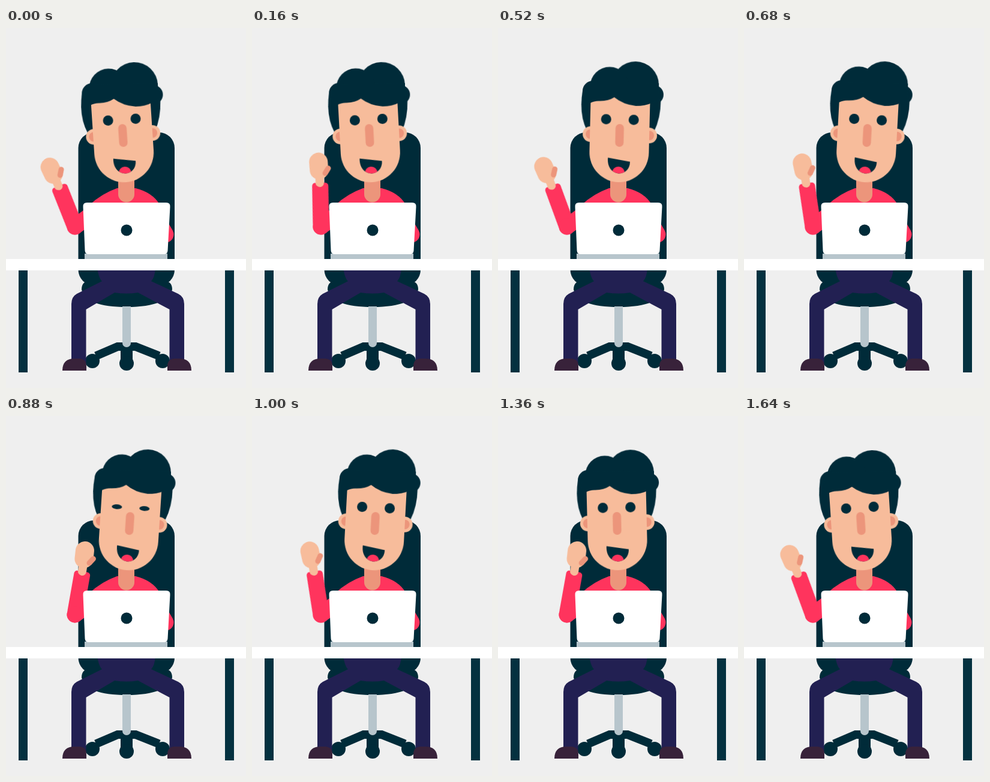
An HTML page without scripts that plays this animation: 400 px wide and 600 px high, repeating every 1.68 s.

```html
<!DOCTYPE html>
<html lang="en">
<head>
<meta charset="utf-8">
<title>Waving at the desk</title>
<style>
  :root {
    --dark: #002b39;
    --pink: #ff345d;
    --skin: #f7bc9b;
    --shade: #ec957b;
    --pants: #222052;
    --metal: #b7c5cc;
    --sine: cubic-bezier(.364, 0, .636, 1);
  }
  html, body { margin: 0; width: 100%; height: 100%; overflow: hidden; background: #efefef; }
  svg { display: block; width: 100%; height: 100%; }
  .dark { fill: var(--dark); }
  .pink { fill: var(--pink); }
  .skin { fill: var(--skin); }
  .shade { fill: var(--shade); }
  .pants { fill: var(--pants); }
  .metal { fill: var(--metal); }
  .shoe { fill: #38223a; }
  .leg { fill: #043140; }
  .line { fill: none; stroke-linecap: round; stroke-linejoin: round; }

  .head {
    transform-origin: 200.5px 266px;
    animation: tilt 840ms var(--sine) infinite alternate;
  }
  /* hair leans less than the face */
  .hair {
    transform-origin: 164px 100px;
    animation: lag 840ms var(--sine) infinite alternate;
  }
  .forearm {
    transform-origin: 115px 331px;
    animation: wave 280ms var(--sine) infinite alternate;
  }
  .eye {
    transform-box: fill-box;
    transform-origin: center;
    animation: blink 1680ms linear infinite;
  }
  @keyframes tilt { from { transform: rotate(-3.75deg); } to { transform: rotate(3.75deg); } }
  @keyframes lag { from { transform: rotate(2.1deg); } to { transform: rotate(-2.1deg); } }
  @keyframes wave { from { transform: rotate(-31.7deg); } to { transform: rotate(1.7deg); } }
  @keyframes blink {
    0%, 44%, 56%, 100% { transform: scaleY(1); }
    50% { transform: scaleY(.1); }
  }
</style>
</head>
<body>
<svg viewBox="0 0 400 600">
  <defs>
    <clipPath id="mouth">
      <path id="lips" d="M182 216.500L219 222.500C219 236 210 242.500 200 242.500C188 241 181 231 182 216.500Z"/>
    </clipPath>
    <path id="shoe" d="M94 571Q94 551 114 551H123Q134 552 134 564V571Z"/>
  </defs>

  <!-- chair -->
  <g class="dark">
    <rect x="120.500" y="174" width="160.500" height="255" rx="26"/>
    <path d="M126 436Q126 423 137 422H266Q277 423 277 436Q268 465 201 465Q133 465 126 436Z"/>
    <path d="M150 546.500L186 531H216L255 546.500" fill="none" stroke="var(--dark)" stroke-width="14"/>
    <rect x="191" y="526" width="20" height="30"/>
    <circle cx="144" cy="555" r="12"/>
    <circle cx="201" cy="559" r="12"/>
    <circle cx="261" cy="555" r="12"/>
  </g>
  <path class="metal" d="M194 464H208V525A7 7 0 0 1 194 525Z"/>

  <!-- legs -->
  <path class="pants" d="M152 400C154 413 157 419 160 422L118 443Q109 448 109 460V560H133.500V469L181 441Q201 444 220 441L272.500 469V560H297V460Q297 448 287 443L242 422Q248 416 249 400Z"/>
  <use href="#shoe" class="shoe"/>
  <use href="#shoe" class="shoe" transform="matrix(-1 0 0 1 403 0)"/>

  <!-- body -->
  <path class="pink" d="M140 320V294Q160 276 185 267H216Q244 274 256 294V320Z"/>
  <path class="line" d="M245 308L266 344" stroke="var(--pink)" stroke-width="27"/>
  <path class="line" d="M115 331L150 305" stroke="var(--pink)" stroke-width="27"/>
  <path class="shade" d="M187 245H214V277A13.5 13.5 0 0 1 187 277Z"/>

  <g class="head">
    <g class="dark hair">
      <circle cx="225" cy="95" r="39"/>
      <circle cx="182" cy="98" r="32.500"/>
      <circle cx="154" cy="106" r="17"/>
      <circle cx="256" cy="111" r="16"/>
      <path d="M137 106Q131 145 145 172H257Q270 145 267 106Z"/>
    </g>
    <g class="skin">
      <circle cx="152" cy="178" r="13"/>
      <circle cx="250" cy="178" r="13"/>
    </g>
    <g class="shade">
      <circle cx="152" cy="178" r="8"/>
      <circle cx="250" cy="178" r="8"/>
    </g>
    <path class="skin" d="M151 110H250V207A49.5 50 0 0 1 151 207Z"/>
    <path class="dark hair" d="M140 116L150 126Q157 122 166 122.500Q181 122 190 116Q205 128 226 130Q242 130 252 125L264 120V92H150Z"/>
    <g class="dark">
      <circle class="eye" cx="177.5" cy="152.5" r="8.5"/>
      <circle class="eye" cx="223.5" cy="152.5" r="8.5"/>
    </g>
    <rect class="shade" x="193.5" y="160" width="14" height="38" rx="7"/>
    <use href="#lips" class="dark"/>
    <circle class="pink" cx="200" cy="241.500" r="10.500" clip-path="url(#mouth)"/>
  </g>

  <g class="forearm">
    <g class="pink" transform="rotate(10 115 331)">
      <rect x="101.5" y="258" width="27" height="73" rx="5"/>
      <circle cx="115" cy="331" r="13.5"/>
    </g>
    <g class="line" stroke="var(--skin)">
      <path d="M130 240L127 259" stroke-width="14"/>
      <path d="M131.5 224.5L130 238" stroke-width="31"/>
    </g>
    <path class="line" d="M139 245L145.500 238" stroke="var(--shade)" stroke-width="9"/>
  </g>

  <!-- laptop -->
  <path class="metal" d="M131 376H269V386H131Z"/>
  <path fill="#fff" d="M135 291H267Q274 291 273.500 298L269.500 371Q269 377 263 377H138Q132 377 131.500 371L128.500 298Q128 291 135 291Z"/>
  <circle class="dark" cx="201" cy="337" r="9.500"/>

  <!-- desk -->
  <rect x="0" y="385" width="400" height="19" fill="#fff"/>
  <rect class="leg" x="21" y="404" width="15" height="170"/>
  <rect class="leg" x="365" y="404" width="15" height="170"/>
</svg>
</body>
</html>
```
